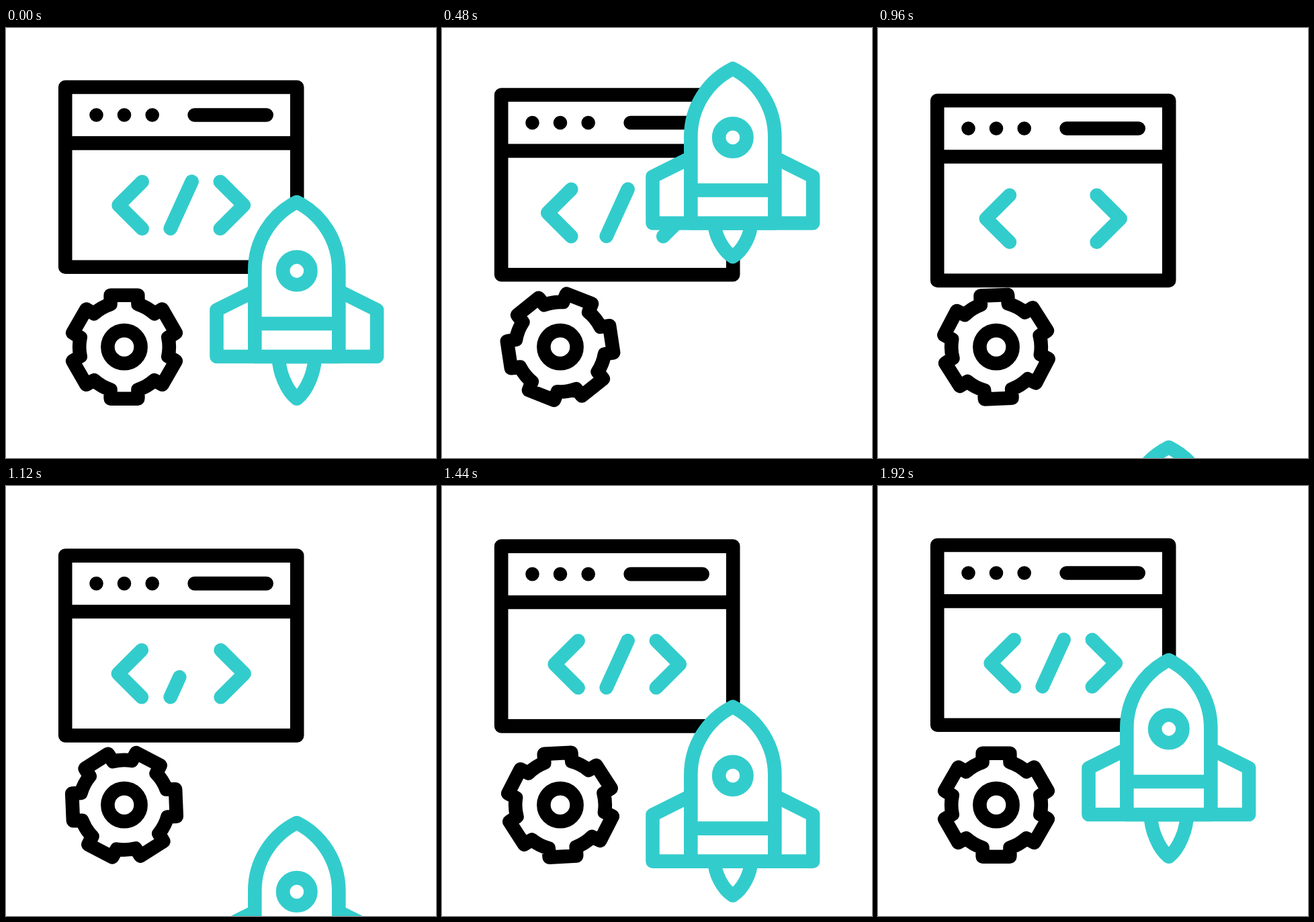
Write an HTML page that moves like this. It is 640x640 px and loops after 2 s.

```html
<!DOCTYPE html>
<html lang="en">
<head>
<meta charset="utf-8">
<title>Launch</title>
<style>
  html, body { margin: 0; width: 100%; height: 100%; overflow: hidden; background: #fff; }
  svg { display: block; width: 100%; height: 100%; }
  g { stroke-width: 20.6; stroke-linecap: round; stroke-linejoin: round; }
  .black { stroke: #000; fill: none; }
  .teal { stroke: #3cc; fill: none; }
  .teal.solid { fill: #fff; }
</style>
</head>
<body>
<svg viewBox="0 0 640 640">
  <g id="page" class="black">
    <path d="M88.2 88H433.2V355.8H88.2ZM88.2 171.4H433.2"/>
    <path d="M134.5 129.5h0M176 129.5h0M217.7 129.5h0M280.6 129.5H387.7"/>
    <g class="teal">
      <path id="left" d="M202.7 228.7L167.6 263.7L202.7 298.7"/>
      <path id="slash" d="M244.7 298.5L276.6 228.5" pathLength="1"/>
      <path id="right" d="M318.8 228.7L353.9 263.7L318.8 298.7"/>
    </g>
  </g>
  <g class="black">
    <path id="gear"/>
    <circle cx="176" cy="474.7" r="24.6"/>
  </g>
  <g id="rocket" class="teal solid">
    <path id="flame"/>
    <path d="M370.3 391.5L313.5 419.8V489H552.1V419.8L495.3 391.5Z"/>
    <path d="M370.3 489V360A113 113 0 0 1 432.8 259A113 113 0 0 1 495.3 360V489ZM370.3 440H495.3"/>
    <circle cx="432.8" cy="361.5" r="20.7"/>
  </g>
</svg>
<script>
  const LOOP = 2000, STEP = 40;
  const $ = id => document.getElementById(id);
  const shift = (id, x, y) => $(id).setAttribute('transform', `translate(${x} ${y})`);

  // Cubic ease (.5, 0, .5, 1) between two times, solved in closed form
  function ease(t, from, to) {
    const u = Math.min(1, Math.max(0, (t - from) / (to - from)));
    const s = Math.sinh(Math.asinh(4 * u - 2) / 3);
    return 0.5 + 1.5 * s - 2 * s ** 3;
  }

  // Rises from a to b, falls from c to d
  const pulse = (t, a, b, c, d) => ease(t, a, b) - ease(t, c, d);

  function gearPath() {
    const tooth = [[-20.5, -63.6], [-20.3, -77], [20.3, -77], [20.5, -63.6]];
    let d = '';
    for (let i = 0; i < 6; i++) {
      const c = Math.cos(i * Math.PI / 3), s = Math.sin(i * Math.PI / 3);
      tooth.forEach(([x, y], j) => {
        const join = j ? 'L' : i ? 'A66.8 66.8 0 0 1 ' : 'M';
        d += `${join}${x * c - y * s} ${x * s + y * c}`;
      });
    }
    return d + 'A66.8 66.8 0 0 1 -20.5 -63.6Z';
  }

  function flamePath(length) {
    const y = k => 489 + k * length;
    return `M405.8 489C405.8 ${y(0.36)} 418 ${y(0.82)} 432.8 ${y(1)}` +
      `C447.6 ${y(0.82)} 459.8 ${y(0.36)} 459.8 489Z`;
  }

  // Leaves through the top, comes back from below
  function rocketY(t) {
    return t < 840
      ? -403 * (Math.max(0, t - 110) / 530) ** 1.97
      : 365 * (Math.max(0, 1785 - t) / 825) ** 1.9;
  }

  function draw(t) {
    shift('page', 0, 20.8 * pulse(t, 80, 842, 842, 1605));

    const spread = 13.6 * pulse(t, 80, 700, 700, 1220);
    shift('left', -spread, 0);
    shift('right', spread, 0);

    const drawn = 1 - pulse(t, 650, 900, 1000, 1260);
    $('slash').setAttribute('stroke-dasharray', drawn > 0.999 ? 'none' : `${drawn} 2`);
    $('slash').setAttribute('visibility', drawn > 0.001 ? 'visible' : 'hidden');

    $('gear').setAttribute('transform',
      `translate(176 474.7) rotate(${180 * ease(t, 80, 1600)})`);

    shift('rocket', 0, rocketY(t));
    $('flame').setAttribute('d', flamePath(62.7 - 12.8 * pulse(t, 80, 400, 1320, 1900)));
  }

  function tick() {
    const t = performance.now() % LOOP;
    draw(Math.floor(t / STEP) * STEP);
    requestAnimationFrame(tick);
  }

  $('gear').setAttribute('d', gearPath());
  tick();
</script>
</body>
</html>
```
